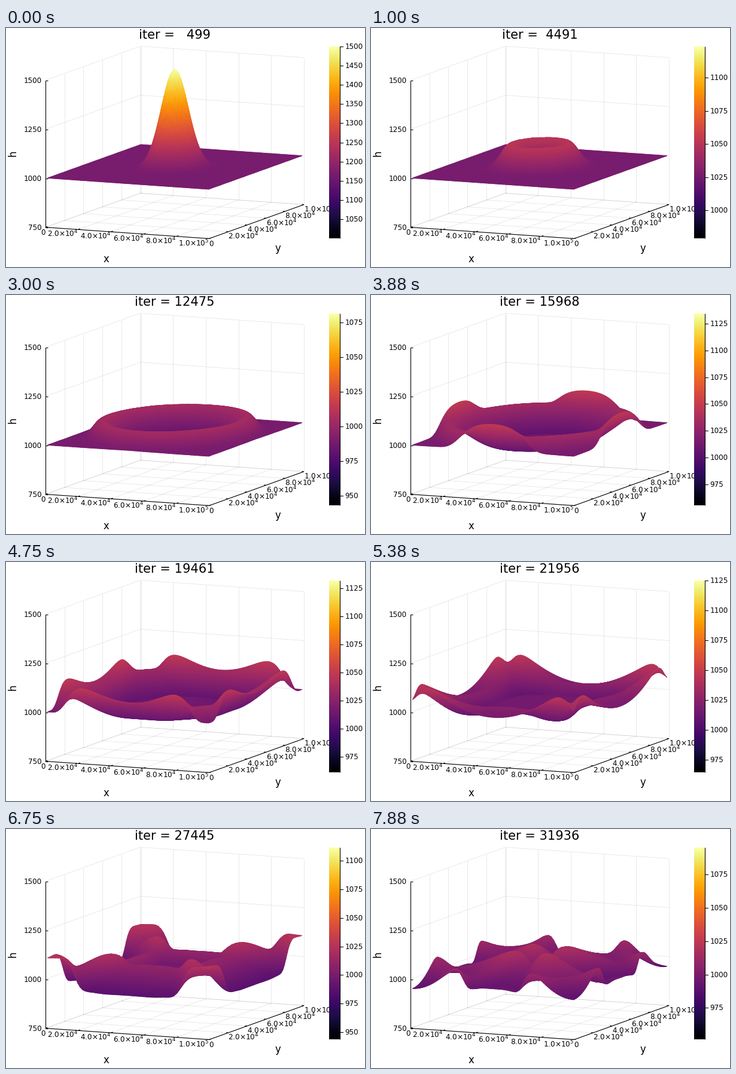
Write a matplotlib script that moves like this. It is 600x400 px and loops after 8000 ms.

```python
import numpy as np
import matplotlib.pyplot as plt
from matplotlib.animation import FuncAnimation

FRAMES, INTERVAL, ITERS = 64, 125, 499
N, SIZE, G, DEPTH, BUMP, WIDTH = 65, 1e5, 9.81, 1000, 500, 1e4
FRAME_TIME, SUBSTEPS = 12.6, 6
DX = SIZE / N
Z_LO, Z_HI = 750, 1500
TICK, GUIDE, TITLE = (px * 0.72 for px in (12, 16.5, 21))


# Shallow water in a closed square basin; q holds h, hu, hv.
def flux(q, m):
    f = q * (q[m] / q[0])
    f[m] += G * q[0] ** 2 / 2
    return f


def divergence(q, m):
    """Limited finite-volume flux divergence along the last axis."""
    p = np.pad(q, ((0, 0), (0, 0), (2, 2)), mode="symmetric")
    p[m, :, :2] *= -1
    p[m, :, -2:] *= -1
    d = np.diff(p)
    a, b = d[..., :-1], d[..., 1:]
    steep = np.minimum(2 * np.minimum(abs(a), abs(b)), abs(a + b) / 2)
    slope = np.where(a * b > 0, np.sign(a) * steep, 0)
    mid = p[..., 1:-1]
    left = (mid + slope / 2)[..., :-1]
    right = (mid - slope / 2)[..., 1:]
    speed = np.maximum(*(abs(s[m] / s[0]) + np.sqrt(G * s[0]) for s in (left, right)))
    f = (flux(left, m) + flux(right, m) - speed * (right - left)) / 2
    return np.diff(f) / DX


def rate(q):
    along_x = divergence(q.swapaxes(1, 2), 1).swapaxes(1, 2)
    return -along_x - divergence(q, 2)


def simulate():
    c = (np.arange(N) + 0.5) * DX - SIZE / 2
    q = np.zeros((3, N, N))
    q[0] = DEPTH + BUMP * np.exp(-(c[:, None] ** 2 + c ** 2) / WIDTH ** 2)
    dt = FRAME_TIME / SUBSTEPS
    states = [q[0].copy()]
    for _ in range(FRAMES - 1):
        for _ in range(SUBSTEPS):
            q1 = q + dt * rate(q)
            q = (q + q1 + dt * rate(q1)) / 2
        states.append(q[0].copy())
    return states


def project(u, v, z):
    """Unit floor coordinates and height to stage pixels."""
    x = 66 + 273.5 * u + 158.5 * v
    y = 333.5 + 19 * u - 57 * v - 246 * (z - Z_LO) / (Z_HI - Z_LO)
    return x, y


fig = plt.figure(figsize=(6, 4), dpi=100, facecolor="white")
ax = fig.add_axes([0, 0, 1, 1])
ax.axis("off")


def segment(p, q, **style):
    ax.plot(*zip(p, q), solid_capstyle="butt", **style)


def grid(a, b):
    segment(project(*a), project(*b), color="black", alpha=0.1, lw=0.6, zorder=1)


def axis_line(p, q):
    segment(p, q, color="black", lw=0.8, zorder=3)


def power(k):
    if k == 0:
        return "0"
    return "1.0×10$^5$" if k == 5 else f"{2 * k}.0×10$^4$"


def draw_box():
    for z in range(Z_LO, Z_HI + 1, 250):
        grid((0, 0, z), (0, 1, z))
        grid((0, 1, z), (1, 1, z))
        x, y = project(0, 0, z)
        axis_line((x, y), (x + 3.5, y))
        ax.text(60, y + 4.5, str(z), fontsize=TICK, ha="right")
    for k in range(6):
        t = k / 5
        grid((0, t, Z_LO), (0, t, Z_HI))
        grid((t, 1, Z_LO), (t, 1, Z_HI))
        grid((0, t, Z_LO), (1, t, Z_LO))
        grid((t, 0, Z_LO), (t, 1, Z_LO))

        x, y = project(t, 0, Z_LO)
        axis_line((x, y), (x + 3.3, y - 1.2))
        ax.text(x, y + 12.5, power(k), fontsize=TICK, ha="right")
        x, y = project(1, t, Z_LO)
        axis_line((x, y), (x - 3.5, y - 0.3))
        ax.text(x, y + 12.5, power(k), fontsize=TICK, ha="left")

    origin = project(0, 0, Z_LO)
    corner = project(1, 0, Z_LO)
    axis_line(origin, project(0, 0, Z_HI))
    axis_line(origin, corner)
    axis_line(corner, project(1, 1, Z_LO))
    ax.text(167.5, 392.5, "x", fontsize=GUIDE, ha="center")
    ax.text(454, 373.5, "y", fontsize=GUIDE, ha="center")
    ax.text(12, 210, "h", fontsize=GUIDE, rotation=90, ha="center", va="center")


BAR_TOP, BAR_BOTTOM, BAR_L, BAR_R = 31, 352, 540, 558
draw_box()
ax.imshow(np.linspace(1, 0, 256)[:, None], cmap="inferno", aspect="auto",
          extent=(BAR_L, BAR_R, BAR_BOTTOM, BAR_TOP), zorder=4)
segment((BAR_R, BAR_TOP), (BAR_R, BAR_BOTTOM), color="black", lw=0.8, zorder=5)
title = ax.text(282, 18, "", fontsize=TITLE, ha="center")
ax.set_xlim(0, 600)
ax.set_ylim(400, 0)

states = simulate()
cells = (np.arange(N) + 0.5) / N
U, V = np.meshgrid(cells, cells[::-1])  # rows run from back to front
live = []


def draw_bar_ticks(lo, hi):
    step = 25 if hi - lo < 225 else 50
    first = int(lo // step + 1) * step
    for value in range(first, int(hi) + 1, step):
        y = BAR_BOTTOM - (value - lo) / (hi - lo) * (BAR_BOTTOM - BAR_TOP)
        live.extend(ax.plot((BAR_R, BAR_R + 5), (y, y), color="black", lw=0.8, zorder=5))
        live.append(ax.text(566.5, y + 4, str(value), fontsize=TICK, zorder=5))


def update(i):
    while live:
        live.pop().remove()
    h = states[i]
    surface = h.T[::-1]
    x, y = project(U, V, surface)
    live.append(ax.pcolormesh(x, y, surface, shading="gouraud", cmap="inferno",
                              vmin=Z_LO, vmax=Z_HI, zorder=2))
    draw_bar_ticks(h.min(), h.max())
    title.set_text(f"iter = {ITERS * (i + 1):5d}")
    return live + [title]


anim = FuncAnimation(fig, update, frames=FRAMES, interval=INTERVAL,
                     repeat=True, repeat_delay=0, blit=False)
plt.show()
```
